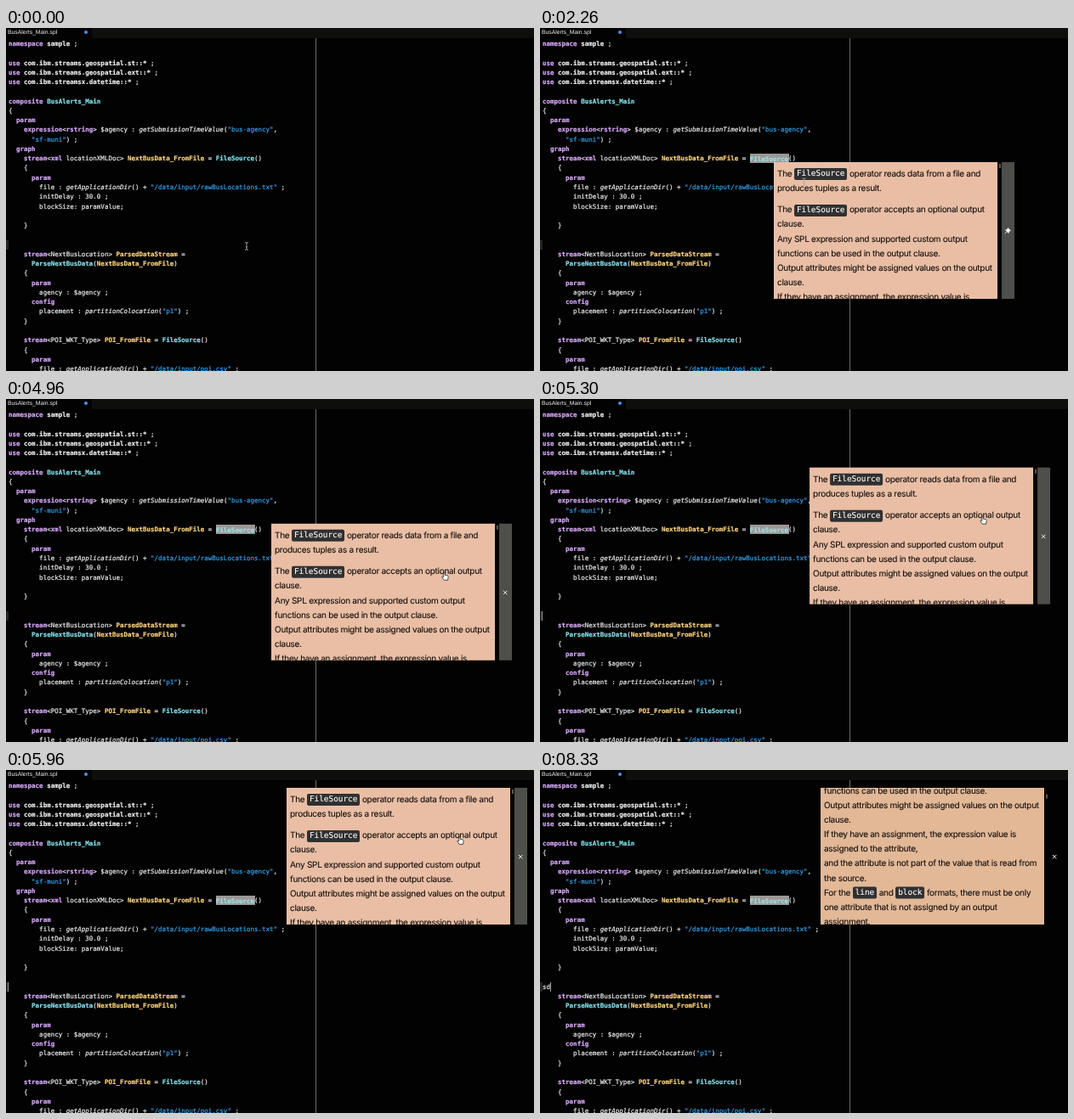
These frames come from a looping animation (621 by 404 pixels, 8530 ms). An HTML page:

```html
<!DOCTYPE html>
<html lang="en">
<head>
<meta charset="utf-8">
<title>Operator help</title>
<style>
html, body { margin: 0; width: 100%; height: 100%; overflow: hidden; background: #020202; }
#stage { position: relative; width: 621px; height: 404px; overflow: hidden; background: #020202; text-rendering: geometricPrecision; }
#stage > *, #help > * { position: absolute; }
#tabs { left: 101px; top: 0; width: 520px; height: 12px; background: #0e0e0c; }
#tab { left: 2px; top: .6px; font: 6.8px/9px "Liberation Sans", Arial, sans-serif; color: #f4f4f4; white-space: nowrap; }
#dot { left: 92px; top: 3px; width: 4px; height: 4px; border-radius: 50%; background: #4a94e6; }
#split { left: 364px; top: 12px; width: 1px; height: 392px; background: #6e6a68; }
#code, #glow span { font: 7.5px/11.27px "DejaVu Sans Mono", monospace; -webkit-text-stroke: .2px; }
#code { left: 3px; top: 13px; margin: 0; color: #efefef; white-space: pre; }
.kw, .type, .name, .path { font-weight: bold; }
.kw { color: #d8a8fa; }
.type { color: #84e3ee; }
.name { color: #fbd27c; }
.str { color: #35a2ee; }
.fn { font-style: italic; }
#mark { left: 0; top: 250px; width: 3px; height: 11px; background: #252525; }
#caret { top: 250px; width: 1px; height: 11px; background: #a0a0a0; }
#glow { left: 247px; top: 148px; width: 45.5px; height: 11px; background: #9c9795; }
#glow span { position: absolute; left: -.2px; top: .6px; font-weight: bold; color: #9be4e6; }
#help { left: 0; top: 0; width: 283px; height: 161px; }
#body { left: 0; top: 0; width: 263px; height: 161px; overflow: hidden; }
#text { padding: 5.7px 0 0 4px; font: 10px/17.15px Inter, "Liberation Sans", sans-serif; letter-spacing: -.28px; color: #15100d; -webkit-text-stroke: .12px; white-space: pre; }
#text p { margin: 0 0 8.2px; }
#text code { padding: 1.4px 3px; border-radius: 2px; font: 9.4px/0 "DejaVu Sans Mono", monospace; letter-spacing: 0; color: #fff; background: #303030; }
#thumb { left: 265px; top: 2px; width: 1.5px; height: 5px; background: #5a5a52; }
#bar { left: 268px; top: 0; width: 15px; height: 161px; }
#pin, #close { left: 270px; top: 76px; }
svg { display: block; overflow: visible; }
#beam, #hand { left: 0; top: 0; }
</style>
</head>
<body>
<div id="stage">
  <div id="tabs"></div><div id="tab">BusAlerts_Main.spl</div><div id="dot"></div>
  <div id="split"></div><div id="mark"></div>
  <pre id="code"></pre>
  <div id="glow"><span>FileSource</span></div>
  <div id="caret"></div>
  <div id="help">
    <div id="body"><div id="text"><p>The <code>FileSource</code> operator reads data from a file and
produces tuples as a result.</p><p>The <code>FileSource</code> operator accepts an optional output
clause.
Any SPL expression and supported custom output
functions can be used in the output clause.
Output attributes might be assigned values on the output
clause.
If they have an assignment, the expression value is
assigned to the attribute,
and the attribute is not part of the value that is read from
the source.
For the <code>line</code> and <code>block</code> formats, there must be only
one attribute that is not assigned by an output
assignment.</p></div></div>
    <div id="thumb"></div><div id="bar"></div>
    <svg id="pin" width="10" height="10"><path d="M5.4 1.4 8.6 4.6 7.7 5 6.5 6.2 6.3 7.7 4.3 5.9 1.8 8.3 4.1 5.7 2.3 3.7 3.8 3.5 5 2.3Z" fill="#eee" stroke="#eee" stroke-width=".5"/></svg>
    <svg id="close" width="10" height="10"><path d="M3 3 7.4 7.4M7.4 3 3 7.4" stroke="#eee" stroke-width="1"/></svg>
  </div>
  <svg id="beam" width="1" height="1"><path d="M-2-4.5Q0-4.5 0-3.2Q0-4.5 2-4.5M0-3.5V3.5M-2 4.5Q0 4.5 0 3.2Q0 4.5 2 4.5M-1 1H1" fill="none" stroke="#aaa" stroke-width=".9"/></svg>
  <svg id="hand" width="1" height="1"><path d="M-1.8-4.2Q-1-5-.4-4.2V-1.6L2.8-.9Q3.8-.5 3.7.8L3 4.6H-1.2L-3.8.8Q-3.6-.4-1.8.8Z" fill="#fff" stroke="#222" stroke-width=".8"/></svg>
</div>
<script>
const source = `namespace sample ;

use com.ibm.streams.geospatial.st::* ;
use com.ibm.streams.geospatial.ext::* ;
use com.ibm.streamsx.datetime::* ;

composite BusAlerts_Main
{
  param
    expression<rstring> $agency : getSubmissionTimeValue("bus-agency",
      "sf-muni") ;
  graph
    stream<xml locationXMLDoc> NextBusData_FromFile = FileSource()
    {
      param
        file : getApplicationDir() + "/data/input/rawBusLocations.txt" ;
        initDelay : 30.0 ;
        blockSize: paramValue;

    }

@
    stream<NextBusLocation> ParsedDataStream =
      ParseNextBusData(NextBusData_FromFile)
    {
      param
        agency : $agency ;
      config
        placement : partitionColocation("p1") ;
    }

    stream<POI_WKT_Type> POI_FromFile = FileSource()
    {
      param
        file : getApplicationDir() + "/data/input/poi.csv" ;`;

const syntax = {
  str: '"[^"]*"',
  path: 'com\\.[\\w.]+::\\*|\\bsample\\b',
  kw: '\\b(?:namespace|use|composite|param|graph|stream|expression|rstring|xml|config)\\b',
  type: '\\b(?:FileSource|ParseNextBusData|BusAlerts_Main)\\b',
  name: '\\b(?:NextBusData_FromFile|ParsedDataStream|POI_FromFile)\\b',
  fn: '\\w+(?=\\()'
};
const kinds = Object.keys(syntax);
const pattern = new RegExp(kinds.map(k => `(${syntax[k]})`).join('|'), 'g');
const $ = id => document.getElementById(id);

$('code').innerHTML = source.replace(/</g, '&lt;')
  .replace(pattern, (word, ...groups) =>
    `<span class="${kinds[groups.findIndex(g => g !== undefined)]}">${word}</span>`)
  .replace('@', '<span id="typed"></span>');

const LOOP = 8530, OPEN = 1300, PIN = 4530, DRAG = 4760, TYPE = 8160;

const ramp = (t, from, to) => Math.min(1, Math.max(0, (t - from) / (to - from)));
const smooth = f => f * f * (3 - 2 * f);
const linear = f => f;

// Each move is { from, to, at: [x, y] } and starts where the last one ended.
function travel(start, moves, t, ease) {
  return moves.reduce((pos, { from, to, at }) => {
    const f = ease(ramp(t, from, to));
    return pos.map((v, i) => v + (at[i] - v) * f);
  }, start);
}

const approach = [
  { from: 30, to: 860, at: [285, 153] },
  { from: 1800, to: 2300, at: [311, 182] },
  { from: 2560, to: 4230, at: [550, 239] },
  { from: PIN, to: DRAG, at: [480, 220] }
];
const drag = [
  { from: DRAG, to: 4960, at: [312, 147] },
  { from: 4960, to: 5500, at: [320, 42] },
  { from: 5500, to: 5800, at: [330, 21] }
];
const leave = [
  { from: 6260, to: 6450, at: [486, 111] },
  { from: 7160, to: 7830, at: [66, 246] }
];

const show = (id, on) => { $(id).style.visibility = on ? 'visible' : 'hidden'; };
const move = (id, x, y) => { $(id).style.transform = `translate(${x}px,${y}px)`; };

function draw(t) {
  const [px, py] = travel([275, 158], drag, t, linear);
  const held = t < DRAG ? travel([283, 257], approach, t, smooth) : [px + 204.5, py + 62];
  const [x, y] = travel(held, leave, t, smooth);
  const scroll = 91 * smooth(ramp(t, 6400, 6700)) + 13.5 * smooth(ramp(t, 7060, 7200));
  const open = t >= OPEN, pinned = t >= PIN;
  const over = open && x > px && x < px + 283 && y > py && y < py + 161;
  const hand = over && (pinned || x > px + 268);

  move('help', px, py);
  $('help').style.opacity = ramp(t, OPEN - 40, OPEN + 100);
  show('help', open);
  show('glow', open);
  $('body').style.background = over ? '#e9bea5' : '#e2b897';
  $('bar').style.background = over ? '#4e4e4b' : 'none';
  $('pin').style.display = pinned ? 'none' : 'block';
  $('close').style.display = pinned ? 'block' : 'none';
  move('text', 0, -scroll);
  move('thumb', 0, scroll * .055);

  const typed = 'sd'.slice(0, t < TYPE ? 0 : t < 8330 ? 1 : 2);
  $('typed').textContent = typed;
  $('caret').style.left = (typed ? 3 + typed.length * 4.5 : 2) + 'px';
  show('caret', typed || (t + 600) % 800 < 400);

  move('beam', x, y);
  move('hand', x, y);
  show('beam', !hand && t < TYPE);
  show('hand', hand);
}

const start = performance.now();
function tick() {
  draw((performance.now() - start) % LOOP);
  requestAnimationFrame(tick);
}
draw(0);
requestAnimationFrame(tick);
</script>
</body>
</html>
```
